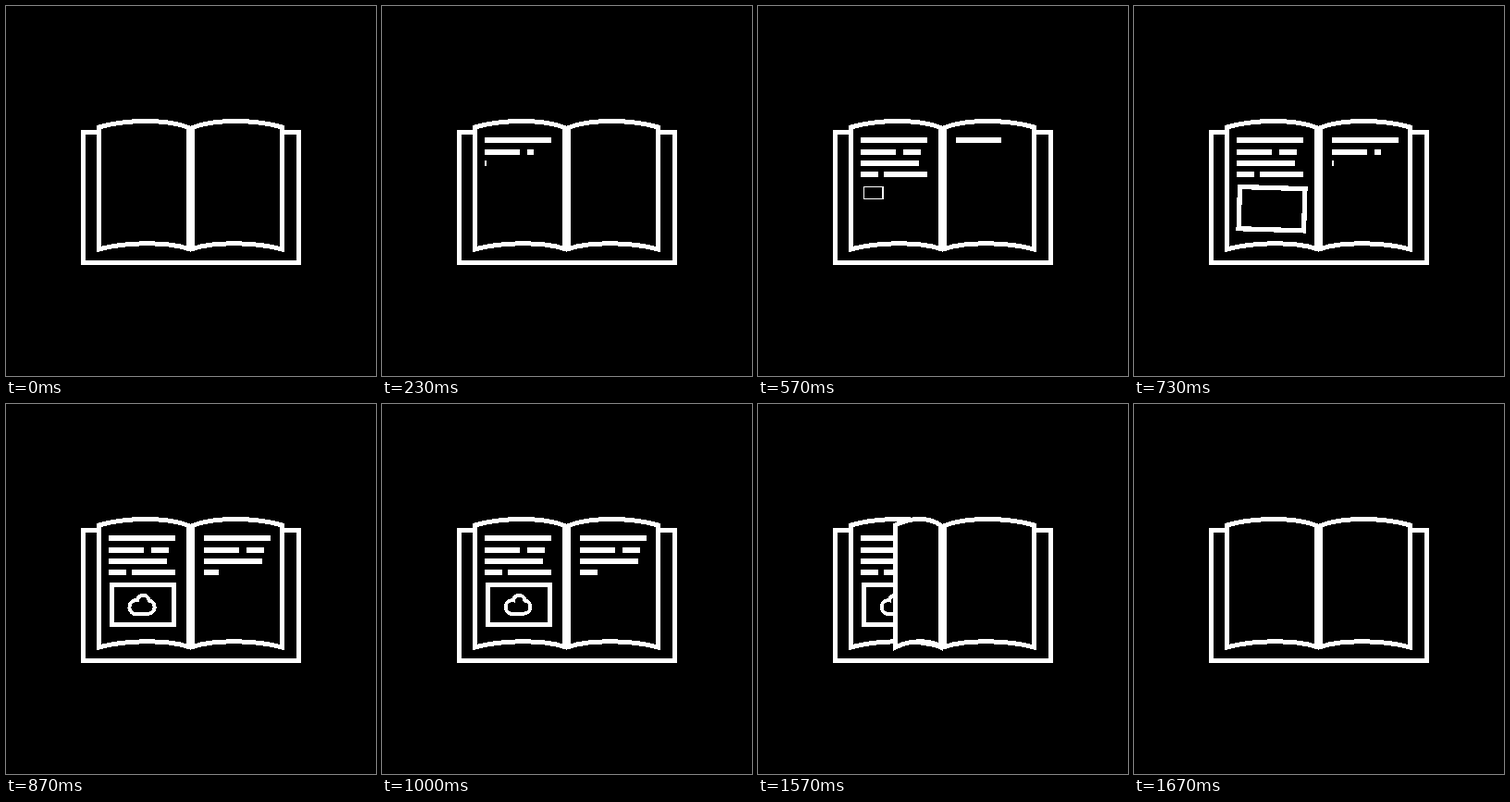
Recreate the animation shown at these times as an HTML page. Size 400x400 px, loop 2.01 s.

```html
<!DOCTYPE html>
<html lang="en">
<head>
<meta charset="utf-8">
<title>Book</title>
<style>
html, body { margin: 0; width: 100%; height: 100%; overflow: hidden; background: #000; }
svg { display: block; width: 400px; height: 400px; shape-rendering: crispEdges; }
path { fill: #000; stroke: #fff; stroke-width: 5; stroke-miterlimit: 3; }
#cloud { stroke-width: 4; }
rect { fill: #fff; }
</style>
</head>
<body>
<svg viewBox="0 0 400 400">
  <path d="M83.5 136.5H316.5V277.5H83.5Z"/>
  <path id="left"/>
  <path id="right"/>
  <g id="notes"></g>
  <path id="box" d="M114.5 195.5H181.5V238.5H114.5Z"/>
  <path id="cloud" d="M138.5 226.6A7.4 7.4 0 0 1 142 212.3A6.3 6.3 0 0 1 154.5 212.5A7.1 7.1 0 0 1 153.5 226.6Z"/>
  <path id="flip"/>
  <g id="story"></g>
</svg>
<script>
const LOOP = 2010, STEP = 100 / 3, SPINE = 199.5;
const WRITE_RIGHT = 15, POP_BOX = 15.3, POP_CLOUD = 22, TURN = 42, TURN_STEPS = 8;
const PEN_SPEED = 24.5, ROW_DELAY = 3.45, WORD_DELAY = 3.25;

const el = id => document.getElementById(id);
const clamp = x => Math.min(1, Math.max(0, x));
const smooth = x => (x = clamp(x), x * x * (3 - 2 * x));
const easeInOut = (x, p) => x < .5 ? (2 * x) ** p / 2 : 1 - (2 - 2 * x) ** p / 2;

// Grows past full size by 13 %, then settles
const pop = n => 1.13 * smooth(n / 5) - .13 * smooth((n - 5) / 3);

// Each row holds one or two words: [offset, width]
const rows = [[[0, 72]], [[0, 38], [46, 19]], [[0, 63]], [[0, 19], [25, 47]]];
const bars = [];

function addText(group, left, start, lastWords) {
  rows.forEach((words, r) => {
    words.slice(0, r === 3 ? lastWords : 2).forEach(([dx, width], w) => {
      const rect = document.createElementNS('http://www.w3.org/2000/svg', 'rect');
      rect.setAttribute('x', left + dx);
      rect.setAttribute('y', 142 + 12 * r + (r > 0));
      rect.setAttribute('height', 6);
      el(group).append(rect);
      bars.push({ rect, width, start: start + r * ROW_DELAY + w * WORD_DELAY });
    });
  });
}

// One page outline; s runs from 1 (lying right) to -1 (lying left)
function page(s) {
  const x = d => SPINE + s * d;
  const hinge = SPINE + 2 * Math.sign(s);
  return `M${hinge} 131.5C${x(24.5)} 122.3 ${x(69)} 122.3 ${x(99)} 131V263` +
         `C${x(69)} 254.8 ${x(24.5)} 254.8 ${hinge} 262.5Z`;
}

function place(id, x, y, sx, sy, tilt = 0) {
  const node = el(id);
  node.style.display = sx > .01 ? '' : 'none';
  node.setAttribute('transform',
    `translate(${x} ${y}) rotate(${tilt}) scale(${sx} ${sy}) translate(${-x} ${-y})`);
}

function draw(ms) {
  const n = Math.floor((ms + 5) / STEP);
  const turned = clamp((n - TURN) / TURN_STEPS);
  const side = 1 - 2 * easeInOut(turned, 2.5);
  const open = turned < 1;

  for (const { rect, width, start } of bars) {
    rect.setAttribute('width', width * clamp((n - start) * PEN_SPEED / width));
  }
  el('notes').style.display = open ? '' : 'none';

  const size = open ? pop(n - POP_BOX) : 0;
  place('box', 114.5, 195.5, size, size, Math.max(0, size - 1) * 34);
  const puff = open ? pop(n - POP_CLOUD) : 0;
  place('cloud', 147, 217, puff, puff);

  el('flip').style.display = turned > 0 && open ? '' : 'none';
  el('flip').setAttribute('d', page(side));
  place('story', 206, 0, 1 - 4 * (1 - side), 1);
}

addText('notes', 111, 0, 2);
addText('story', 214, WRITE_RIGHT, 1);
el('left').setAttribute('d', page(-1));
el('right').setAttribute('d', page(1));

const begin = performance.now();
function tick() {
  draw((performance.now() - begin) % LOOP);
  requestAnimationFrame(tick);
}
tick();
</script>
</body>
</html>
```
